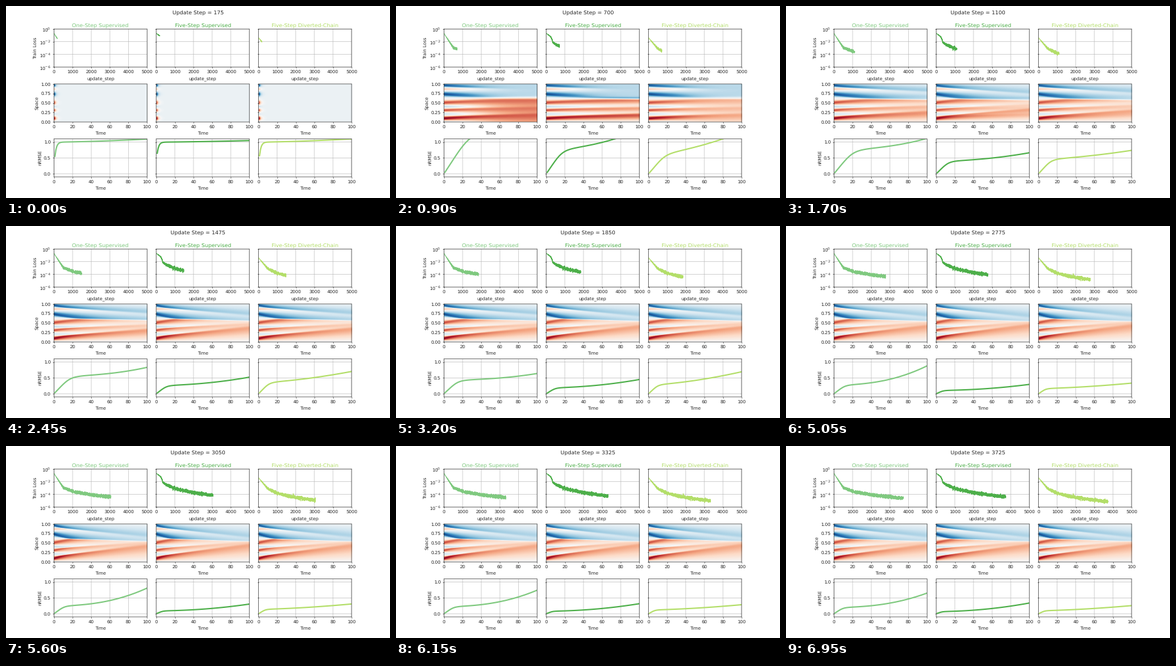
Recreate the animation shown at these times as a matplotlib script. Size 600 px wide and 300 px high, loop 7 s.

```python
import numpy as np
import matplotlib.pyplot as plt
from matplotlib.animation import FuncAnimation

FRAMES, INTERVAL = 140, 50
NX, NT = 256, 100
FIRST, LAST, REF = 175, 3725, 1850

# soft, unsnapped rendering, like a picture scaled down
plt.rcParams.update({"path.snap": False, "text.hinting": "none",
                     "text.color": "0.15", "axes.labelcolor": "0.15",
                     "xtick.labelcolor": "0.15", "ytick.labelcolor": "0.15"})

GROWTH_STEPS = [700, 1100, 1850, 2775, 3725]
MODELS = [
    dict(title="One-Step Supervised", color="#7fc97f",
         loss=dict(start=-.7, slope=.0045, bend=0, ref=-4, power=2.1, shift=100),
         first=(.45, .095), plateau=(.44, 1.1, 0), knee=16, curve=2.4,
         growth=[1, .34, .2, .6, .45], learn=1600, wash=(.35, .42)),
    dict(title="Five-Step Supervised", color="#4daf4a",
         loss=dict(start=-.7, slope=.002, bend=.3, ref=-3.65, power=2.55, shift=150),
         first=(.35, .05), plateau=(.19, 1.45, 0), knee=10.2, curve=2,
         growth=[.6, .26, .26, .19, .27], learn=1150, wash=(1.1, .06)),
    dict(title="Five-Step Diverted-Chain", color="#b3de69",
         loss=dict(start=-1.4, slope=.0035, bend=0, ref=-4.4, power=2.6, shift=150),
         first=(.43, .1), plateau=(.285, .2, .925), knee=10.5, curve=1.6,
         growth=[.7, .28, .41, .17, .16], learn=1350, wash=(.35, .2)),
]

rng = np.random.default_rng(7)
steps = np.arange(0, LAST + 1, 2)
times = np.arange(1, NT + 1)


def loss_curve(start, slope, bend, ref, power, shift):
    """Exponential start that hands over to a power law, with noise."""
    early = start - slope * steps - bend * (steps / 300) ** 6
    late = ref - power * np.log10((steps + shift) / (REF + shift))
    level = .08 * np.logaddexp(early / .08, late / .08)
    spread = .12 * (1 - np.exp(-(steps / 450) ** 2))
    return 10 ** (level + spread * rng.normal(size=steps.size))


def error_curve(model, step):
    """Rise to a plateau, then grow; early steps blend from a failed rollout."""
    r = max(step, 700) / REF
    level, power, rate = model["plateau"]
    plateau = level * r ** -power * np.exp(rate * (1 - r))
    t = times / (model["knee"] * r ** -.6)
    growth = np.interp(step, GROWTH_STEPS, model["growth"])
    trained = (plateau * t / (1 + t ** 4) ** .25
               + growth * (times / 100) ** model["curve"])
    drop, slope = model["first"]
    failed = 1 - drop * np.exp(-(times - 1) / 1.7) + slope * (times / 100) ** 1.5
    w = np.interp(step, [FIRST, 700], [0, 1])
    return failed + (trained - failed) * w


def initial_state(x):
    bumps = [(.09, .95, .05), (.30, .68, .04), (.50, .66, .055),
             (.20, -.2, .03), (.40, -.28, .03),
             (.72, -.9, .06), (.85, .3, .025), (.95, -.9, .042)]
    u = np.zeros_like(x)
    for center, height, width in bumps:
        dist = (x - center + .5) % 1 - .5
        u += height * np.exp(-(dist / width) ** 2)
    return u


def burgers(u0, speeds, nu=.001, dt=.001, sub=10):
    """Viscous Burgers runs, one per speed, with a Godunov flux."""
    k = speeds[:, None]
    u = np.tile(u0, (len(speeds), 1))
    out = [u]
    for _ in range(NT):
        for _ in range(sub):
            right = np.roll(u, -1, axis=1)
            flux = .5 * k * np.maximum(np.maximum(u, 0), -np.minimum(right, 0)) ** 2
            flux = flux - nu * (right - u) * NX
            u = u - dt * NX * (flux - np.roll(flux, 1, axis=1))
        out.append(u)
    return np.stack(out, axis=2)


x = (np.arange(NX) + .5) / NX
X, T = x[:, None], np.arange(NT + 1)[None, :]
u0 = initial_state(x)
SPEEDS = np.linspace(.2, 1, 9)
RUNS = burgers(u0, SPEEDS)
COLLAPSED = (u0[:, None] + .06) * np.exp(-T / 1.6) - .06


def rollout(speed):
    pos = (speed - SPEEDS[0]) / (SPEEDS[1] - SPEEDS[0])
    i = min(int(pos), len(SPEEDS) - 2)
    return RUNS[i] + (RUNS[i + 1] - RUNS[i]) * (pos - i)


def drifting(gain, bias):
    """Half-trained rollout: blues wash out, reds pile up."""
    u = RUNS[0]
    fade = 1 - np.exp(-(T / 50) ** 2)
    upper = 1 / (1 + np.exp(-(X - .64) / .012))
    limit = (gain * u + bias) * (1 - upper) - .27 * upper
    return u + (limit - u) * fade


def field(model, step):
    speed = 1 - np.exp(-(step / model["learn"]) ** 1.6)
    u = rollout(max(speed, SPEEDS[0]))
    u = u + (model["drift"] - u) * np.interp(step, [700, 1200], [1, 0])
    return COLLAPSED + (u - COLLAPSED) * np.interp(step, [FIRST, 700], [0, 1])


def step_at(i):
    # the opening runs slightly faster
    return FIRST + 25 * (i + min(3, round(i / 6)))


fig, axes = plt.subplots(3, 3, figsize=(12, 6), dpi=50, sharey="row",
                         gridspec_kw=dict(wspace=.1, hspace=.45))
heading = fig.suptitle("")

for model, (top, mid, low) in zip(MODELS, axes.T):
    color = model["color"]
    model["losses"] = loss_curve(**model["loss"])
    model["drift"] = drifting(*model["wash"])

    top.set_title(model["title"], color=color)
    top.set_yscale("log")
    top.set(xlim=(0, 5000), ylim=(1e-6, 1), xlabel="update_step",
            xticks=range(0, 5001, 1000))
    top.grid()
    model["loss_line"], = top.plot([], [], color=color, lw=1.8)

    model["image"] = mid.imshow(COLLAPSED[::2], origin="lower", aspect="auto",
                                extent=(0, 100, 0, 1), cmap="RdBu_r",
                                vmin=-1, vmax=1)
    mid.set(xlabel="Time", yticks=np.linspace(0, 1, 5))

    low.set(xlim=(0, 100), ylim=(-.1, 1.1), xlabel="Time", yticks=[0, .5, 1])
    low.grid()
    model["error_line"], = low.plot([], [], color=color, lw=3)

for ax, label in zip(axes[:, 0], ["Train Loss", "Space", "nRMSE"]):
    ax.set_ylabel(label)


def update(i):
    step = step_at(i)
    heading.set_text(f"Update Step = {step}")
    n = step // 2 + 1
    for model in MODELS:
        model["loss_line"].set_data(steps[:n], model["losses"][:n])
        model["image"].set_data(field(model, step)[::2])
        model["error_line"].set_data(times, error_curve(model, step))


anim = FuncAnimation(fig, update, frames=FRAMES, interval=INTERVAL,
                     repeat=True, repeat_delay=0)
plt.show()
```
